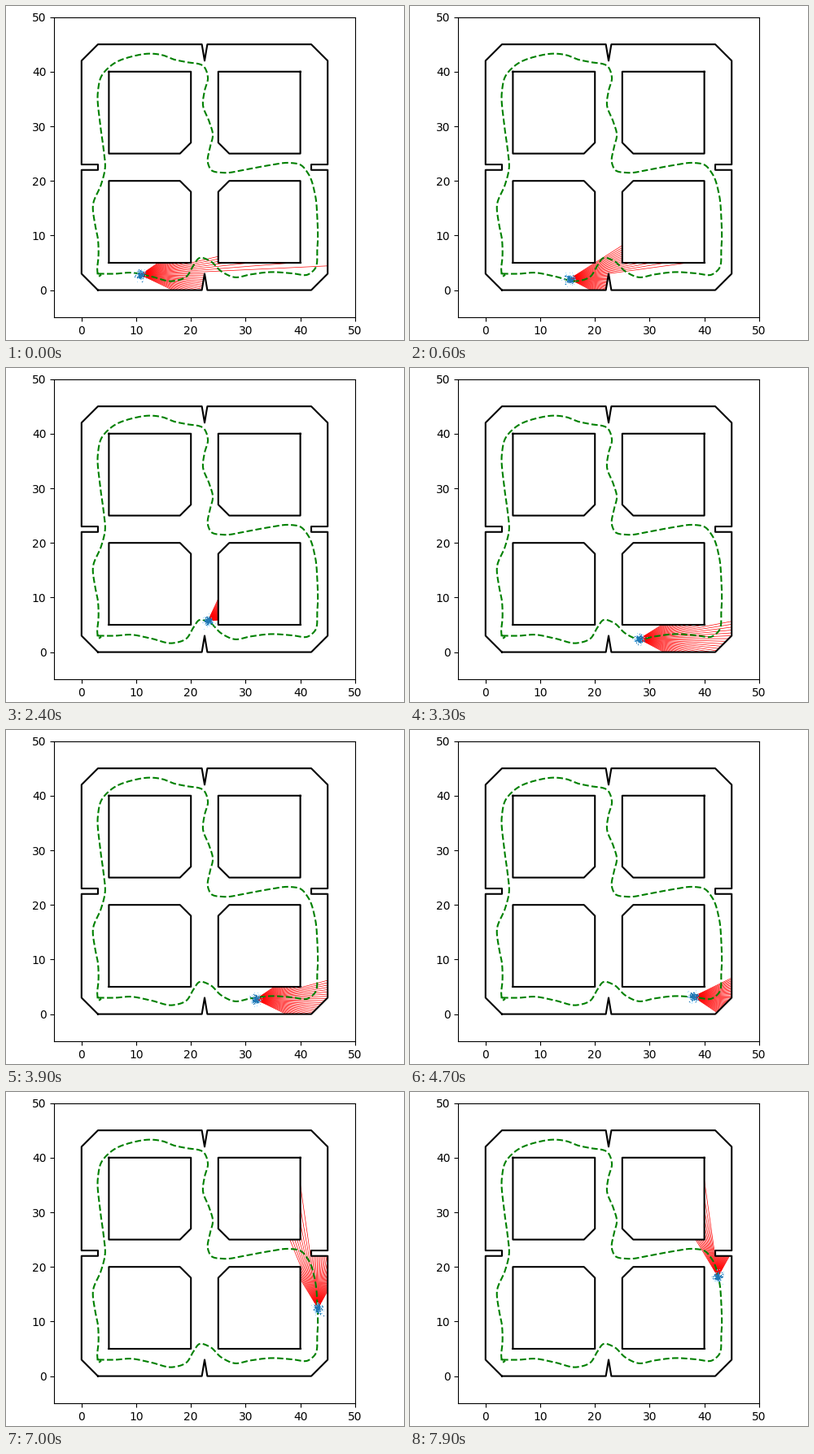
A matplotlib script that plays this animation: 489 by 411 pixels, repeating every 8 s.

```python
import numpy as np
import matplotlib.pyplot as plt
from matplotlib.animation import FuncAnimation
from matplotlib.collections import LineCollection

W, H, DPI = 489, 411, 100
FRAMES, INTERVAL = 80, 100
STEP_MS, STEP_LEAD = 175.9, 130
FAN = np.radians(np.linspace(-30, 30, 35))

OUTER = [(3, 0), (22, 0), (22.5, 3), (23, 0), (42, 0), (45, 3), (45, 22),
         (42, 22), (42, 23), (45, 23), (45, 42), (42, 45), (23, 45),
         (22.5, 42), (22, 45), (3, 45), (0, 42), (0, 23), (3, 23), (3, 22),
         (0, 22), (0, 3)]
BLOCK = np.array([(5, 5), (20, 5), (20, 18), (18, 20), (5, 20)])

ROUTE = np.array([
    (3, 3), (6.3, 3), (8.8, 3.2), (12.7, 2.5), (16.7, 1.65), (19.2, 2.5),
    (20.4, 4.4), (21.6, 5.9), (23.4, 5.4), (25.6, 3.4), (28, 2.35),
    (30.8, 2.85), (34.6, 3.3), (38.3, 3.1), (41.5, 2.9), (42.6, 3.8),
    (43.1, 7.4), (43.1, 13.3), (42.7, 17.5), (41.4, 21.4), (40.1, 22.9),
    (38.1, 23.3), (34.6, 22.9), (30.1, 22.1), (25.9, 21.5), (23.7, 22),
    (23.1, 23.3), (23.4, 25.8), (24, 28.5), (23.4, 30.7), (22.2, 33.9),
    (22.5, 36.5), (23.1, 38.9), (22.4, 40.9), (19.2, 41.75), (17, 42.2),
    (14.9, 43), (12.7, 43.3), (9.7, 42.9), (5.5, 41.2), (3.6, 39.1),
    (3, 36.4), (3.3, 31.2), (4, 26), (4.3, 22.3), (3.6, 19.4), (2.1, 15.6),
    (2.4, 12.4), (3, 9.3), (3.1, 6.2), (2.9, 3.5), (3.1, 2.5), (3.6, 2.8)])

# step, x, y, heading in degrees
POSES = np.array([
    (0, 10.8, 2.8, 4.5), (3, 14.2, 2.2, 1), (6, 17.6, 1.9, 7),
    (8, 19.5, 2.3, 8), (10, 20.9, 3.5, 30), (12, 21.8, 5.1, 42),
    (14, 23.1, 5.7, 35), (16, 24.9, 4.7, 0), (19, 28.1, 2.4, 2),
    (23, 33.1, 2.9, 4), (27, 38, 3.2, -4), (31, 41.6, 3.1, 6),
    (33, 42.5, 3.6, 24), (35, 43.2, 5.2, 42), (39, 43.3, 11.1, 86),
    (45, 42.5, 18.2, 91)])


def hermite(t, p, u):
    """Smooth curve through points p at knots t, sampled at u."""
    m = np.gradient(p, t, axis=0)
    i = np.clip(np.searchsorted(t, u, side="right") - 1, 0, len(t) - 2)
    h = (t[i + 1] - t[i])[:, None]
    s = (u - t[i])[:, None] / h
    return ((2 * s**3 - 3 * s**2 + 1) * p[i] + (s**3 - 2 * s**2 + s) * h * m[i]
            + (3 * s**2 - 2 * s**3) * p[i + 1] + (s**3 - s**2) * h * m[i + 1])


def mirror(p, flip_x, flip_y):
    return np.where([flip_x, flip_y], 45 - p, p)


def closed(p):
    return np.vstack([p, p[:1]])


walls = [closed(np.array(OUTER, float))]
walls += [closed(mirror(BLOCK, fx, fy)) for fx in (0, 1) for fy in (0, 1)]
seg_a = np.vstack([w[:-1] for w in walls])
seg_d = np.vstack([w[1:] for w in walls]) - seg_a


def cross(a, b):
    return a[..., 0] * b[..., 1] - a[..., 1] * b[..., 0]


def cast(pos, heading):
    """End points of the sensor fan where it first meets a wall."""
    ang = heading + FAN
    ray = np.stack([np.cos(ang), np.sin(ang)], axis=1)
    rel = seg_a - pos
    det = cross(ray[:, None], seg_d[None])
    det = np.where(abs(det) < 1e-9, 1e-9, det)
    dist = cross(rel, seg_d)[None] / det
    along = cross(rel[None], ray[:, None]) / det
    hit = (dist > 1e-6) & (along >= 0) & (along <= 1)
    reach = np.where(hit, dist, 80).min(axis=1)
    return pos + ray * reach[:, None]


# the small margin keeps the pixel size from rounding down
fig = plt.figure(figsize=((W + 0.01) / DPI, (H + 0.01) / DPI), dpi=DPI)
ax = fig.add_axes([59.2 / W, 27.8 / H, 369.6 / W, 369.6 / H])
ax.set(xlim=(-5, 50), ylim=(-5, 50),
       xticks=range(0, 51, 10), yticks=range(0, 51, 10))

for w in walls:
    ax.plot(*w.T, color="black", lw=1.5, zorder=3)

knots = np.r_[0, np.cumsum(np.hypot(*np.diff(ROUTE, axis=0).T))]
curve = hermite(knots, ROUTE, np.linspace(0, knots[-1], 900))
ax.plot(*curve.T, "--", color="green", lw=1.5, zorder=2.5)

rays = ax.add_collection(LineCollection([], colors="red", linewidths=0.5,
                                        zorder=2), autolim=False)
haze, = ax.plot([], [], ".", color="lightskyblue", ms=1.2, mew=0, zorder=2.6)
cloud, = ax.plot([], [], ".", color="tab:blue", ms=2, mew=0, zorder=2.7)


def draw(k):
    step = int(np.ceil((k * INTERVAL + STEP_LEAD) / STEP_MS)) - 1
    x, y, deg = hermite(POSES[:, 0], POSES[:, 1:], np.array([float(step)]))[0]
    pos = np.array([x, y])
    rays.set_segments([(pos, end) for end in cast(pos, np.radians(deg))])
    rng = np.random.default_rng(step)
    haze.set_data(*(pos + rng.normal(0, 0.5, (90, 2))).T)
    cloud.set_data(*(pos + rng.normal(0, 0.33, (110, 2))).T)
    return rays, haze, cloud


anim = FuncAnimation(fig, draw, frames=FRAMES, interval=INTERVAL,
                     repeat=True, repeat_delay=0, blit=False)
plt.show()
```
